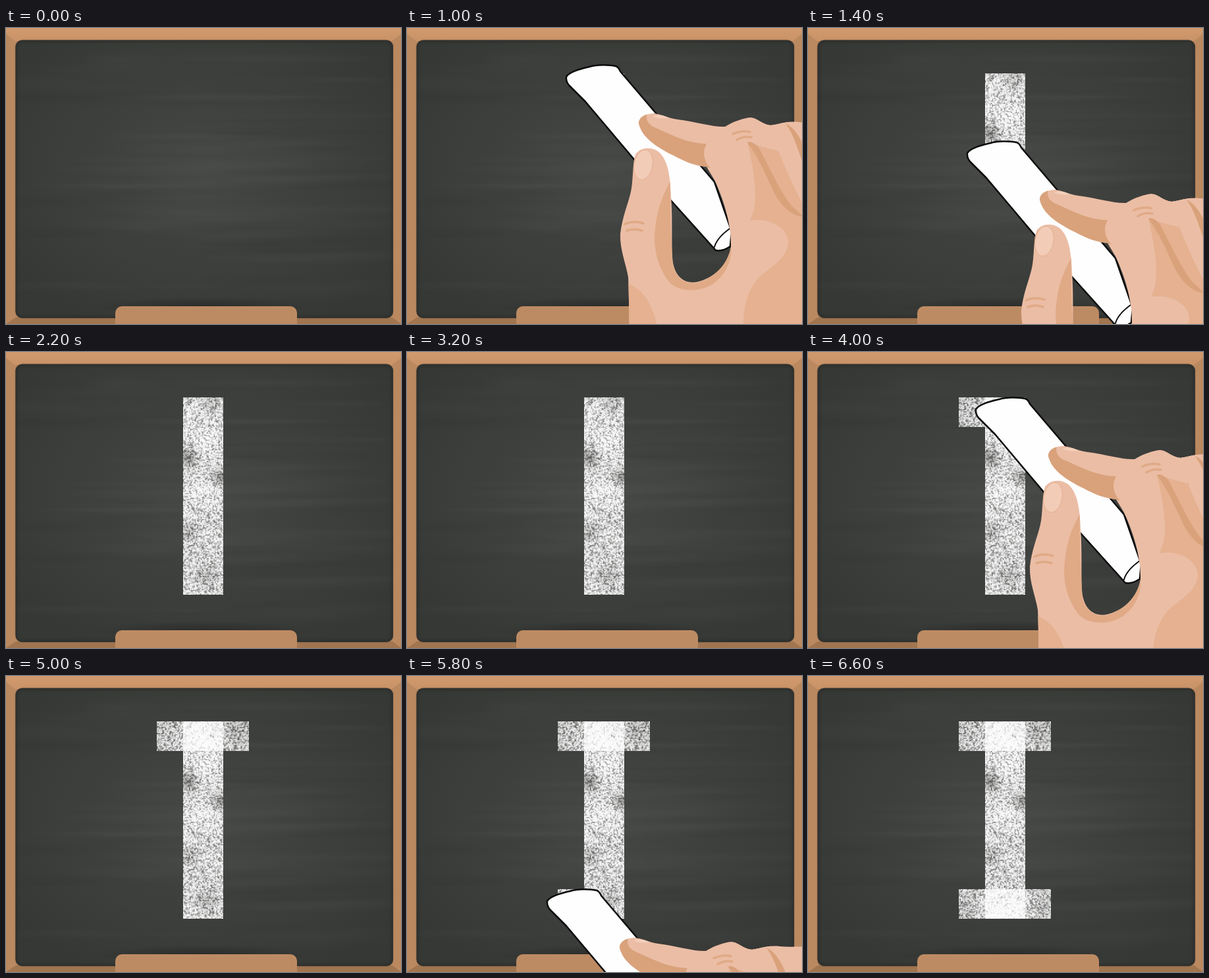
Recreate the animation shown at these times as an HTML page with a canvas. Size 600 by 450 pixels, loop 7200 ms.

```html
<!DOCTYPE html>
<html lang="en">
<head>
<meta charset="utf-8">
<title>Chalk letter</title>
<style>
html, body { margin: 0; width: 100%; height: 100%; overflow: hidden; background: #bd8a62; }
canvas { display: block; width: 600px; height: 450px; }
</style>
</head>
<body>
<canvas id="stage" width="600" height="450"></canvas>
<script>
const LOOP = 7200, STEP = 200;
const ctx = document.getElementById('stage').getContext('2d');

function seeded(seed) {
  return () => {
    seed = (seed + 0x6D2B79F5) | 0;
    let v = Math.imul(seed ^ (seed >>> 15), 1 | seed);
    v = (v + Math.imul(v ^ (v >>> 7), 61 | v)) ^ v;
    return ((v ^ (v >>> 14)) >>> 0) / 4294967296;
  };
}

function layer(w, h, draw) {
  const c = document.createElement('canvas');
  c.width = w;
  c.height = h;
  draw(c.getContext('2d'), w, h);
  return c;
}

function fill(g, color, path) {
  g.fillStyle = color;
  g.fill(new Path2D(path));
}

function line(g, color, width, path) {
  g.strokeStyle = color;
  g.lineWidth = width;
  g.stroke(new Path2D(path));
}

function glow(g, x, y, rx, ry, rgb, alpha) {
  g.save();
  g.translate(x, y);
  g.scale(rx, ry);
  const soft = g.createRadialGradient(0, 0, 0, 0, 0, 1);
  soft.addColorStop(0, `rgba(${rgb},${alpha})`);
  soft.addColorStop(1, `rgba(${rgb},0)`);
  g.fillStyle = soft;
  g.fillRect(-1, -1, 2, 2);
  g.restore();
}

const board = layer(600, 450, g => {
  fill(g, '#bb8960', 'M0 0H600V450H0Z');
  const top = g.createLinearGradient(0, 0, 0, 20);
  top.addColorStop(0, '#d09a6e');
  top.addColorStop(1, '#c99267');
  fill(g, top, 'M0 9V0H600V9L586 20H14Z');
  fill(g, '#a0754f', 'M0 450L15 440H587L600 450Z');

  const face = new Path2D();
  face.roundRect(14.5, 18.5, 573.5, 422.5, 10);
  g.save();
  g.shadowColor = 'rgba(50,44,36,.6)';
  g.shadowBlur = 2;
  g.fillStyle = '#363835';
  g.fill(face);
  g.restore();

  g.save();
  g.clip(face);
  glow(g, 300, 215, 360, 265, '80,82,79', .6);
  const rnd = seeded(7);
  for (let i = 0; i < 75; i++) {
    const rgb = rnd() < .6 ? '105,108,103' : '38,40,37';
    glow(g, 60 + rnd() * 480, 45 + rnd() * 355, 60 + rnd() * 150, 4 + rnd() * 9, rgb, .05 + rnd() * .05);
  }
  glow(g, 300, 424, 165, 15, '28,29,30', .5);
  g.filter = 'blur(2px)';
  g.strokeStyle = 'rgba(38,39,37,.6)';
  g.lineWidth = 5;
  g.stroke(face);
  g.restore();

  g.beginPath();
  g.roundRect(166, 423, 276, 45, 10);
  g.fillStyle = '#bd8b63';
  g.fill();
});

// Grainy white fill; each blotch is [x, y, radius, alpha change].
function chalkBar(w, h, cover, seed, blotches) {
  return layer(w, h, g => {
    const rnd = seeded(seed), cell = 1.8, cols = Math.ceil(w / cell) + 2;
    const grid = Array.from({ length: cols * (Math.ceil(h / cell) + 2) }, rnd);
    const img = g.createImageData(w, h);
    for (let y = 0; y < h; y++) for (let x = 0; x < w; x++) {
      const u = x / cell, v = y / cell, i = u | 0, j = v | 0, a = u - i, b = v - j;
      const at = j * cols + i;
      const grain = (grid[at] * (1 - a) + grid[at + 1] * a) * (1 - b)
        + (grid[at + cols] * (1 - a) + grid[at + cols + 1] * a) * b;
      let alpha = cover + .23 - .8 * grain * grain + (rnd() - .5) * .25;
      for (const [bx, by, r, change] of blotches)
        alpha += change * Math.exp(-((x - bx) ** 2 + (y - by) ** 2) / (r * r));
      const p = (y * w + x) * 4;
      img.data[p] = img.data[p + 1] = img.data[p + 2] = 252;
      img.data[p + 3] = 255 * Math.max(.08, Math.min(.98, alpha));
    }
    g.putImageData(img, 0, 0);
  });
}

const hand = layer(600, 470, g => {
  const light = '#ebbda5', mid = '#e5b190', shade = '#e0aa86', dark = '#d9a27b';
  const chalk = 'M161 87C166 79 184 75 196 72C208 68 228 69 236 71Q240 72 243 79L386 247L412 322L410 345Q398 353 388 351L265 214L190 125Q174 109 165 100Q160 94 161 87Z';
  const skin = 'M271 158C271 148 282 143 295 143C306 144 318 151 330 152C360 156 385 164 402 163C415 155 430 150 441 149C452 150 458 160 472 161C486 159 498 154 514 156C532 158 552 155 567 158C582 172 588 200 600 232V470H257C256 440 256 410 255 392C252 372 242 350 243 326C246 300 255 280 259 262C263 245 261 220 266 205C274 194 290 193 301 201C316 214 319 240 320 268C323 310 320 346 323 370C328 396 345 402 360 399C385 393 406 374 411 346C412 318 403 280 386 244L374 224C350 222 335 212 318 204C298 193 276 180 271 158Z';
  g.lineJoin = g.lineCap = 'round';
  fill(g, '#fefefe', chalk);
  line(g, '#0b0b0b', 2.5, chalk);
  line(g, '#0b0b0b', 2, 'M386 346Q390 331 412 316');
  fill(g, light, skin);

  g.save();
  g.clip(new Path2D(skin));
  fill(g, mid, 'M436 187C444 220 452 262 446 290L440 306C470 300 500 318 498 342C492 372 462 378 446 402C432 424 430 445 430 470H600V215L480 190Z');
  fill(g, mid, 'M250 400C272 406 290 424 300 470H250Z');
  fill(g, light, 'M470 160C480 200 520 290 552 334C560 347 580 352 584 338C586 310 560 260 545 230C530 200 520 170 500 156Z');
  fill(g, light, 'M436 187L444 150L505 150L482 200Z');
  fill(g, dark, 'M436 187C440 184 448 188 454 196C470 226 486 262 502 282C512 292 520 298 522 300C506 300 488 286 476 262C464 236 452 208 436 187Z');
  fill(g, dark, 'M494 158C514 168 520 190 532 216C546 248 572 272 585 300C562 284 540 260 526 232C514 206 510 180 494 158Z');
  fill(g, dark, 'M268 140L284 143C280 156 290 163 302 167C325 178 350 189 374 189C367 202 370 216 380 226L320 212L268 180Z');
  fill(g, shade, 'M319 246C318 290 321 350 323 374C328 396 345 403 360 400C385 394 405 374 411 344C414 372 398 392 384 402C362 416 332 414 318 400C302 380 292 352 296 318C298 296 304 272 319 246Z');
  line(g, shade, 3.5, 'M414 174Q428 168 440 171M420 183Q430 177 442 179M250 311Q264 305 278 310M253 321Q264 317 276 321');
  g.restore();

  fill(g, '#f3cfba', 'M292 147Q304 143 317 150Q303 152 292 147Z');
  g.beginPath();
  g.ellipse(278, 221, 14, 23, .18, 0, Math.PI * 2);
  g.fillStyle = '#f2ccb7';
  g.fill();
  g.strokeStyle = shade;
  g.lineWidth = .8;
  g.stroke();
});

// The writing point of the chalk lies at (220, 91) in the hand layer.
const strokes = [
  { x: 269, y: 69, w: 61, h: 300, start: 1000, steps: 6, from: [301, 77.5], move: [0, 58.3],
    art: chalkBar(61, 300, .77, 11, [[6, 90, 14, -.4], [55, 122, 13, -.35], [42, 10, 16, -.15],
      [28, 62, 24, .16], [30, 145, 22, .13], [8, 205, 15, -.18], [34, 272, 16, -.2]]) },
  { x: 229, y: 69, w: 140, h: 45, start: 3600, steps: 4, from: [220, 91], move: [47, 0],
    art: chalkBar(140, 45, .66, 23, [[70, 22, 34, .2], [118, 12, 18, -.14]]) },
  { x: 229, y: 324, w: 140, h: 45, start: 5600, steps: 4, from: [225, 346], move: [46.7, 0],
    art: chalkBar(140, 45, .69, 37, [[70, 24, 36, .22], [10, 36, 18, -.1], [126, 30, 18, -.1]]) }
];

function render(time) {
  ctx.drawImage(board, 0, 0);
  let point = null;
  for (const s of strokes) {
    const k = Math.floor((time - s.start) / STEP);
    if (k < 0) continue;
    let { w, h } = s;
    if (k < s.steps) {
      point = s.from.map((p, axis) => p + s.move[axis] * k);
      if (s.move[0]) w = Math.max(0, Math.min(w, point[0] - s.x));
      else h = Math.min(h, point[1] - s.y);
    }
    if (w > 0) ctx.drawImage(s.art, 0, 0, w, h, s.x, s.y, w, h);
  }
  if (point) ctx.drawImage(hand, Math.round(point[0] - 220), Math.round(point[1] - 91));
}

const begin = performance.now();
function tick() {
  render((performance.now() - begin) % LOOP);
  requestAnimationFrame(tick);
}
tick();
</script>
</body>
</html>
```
